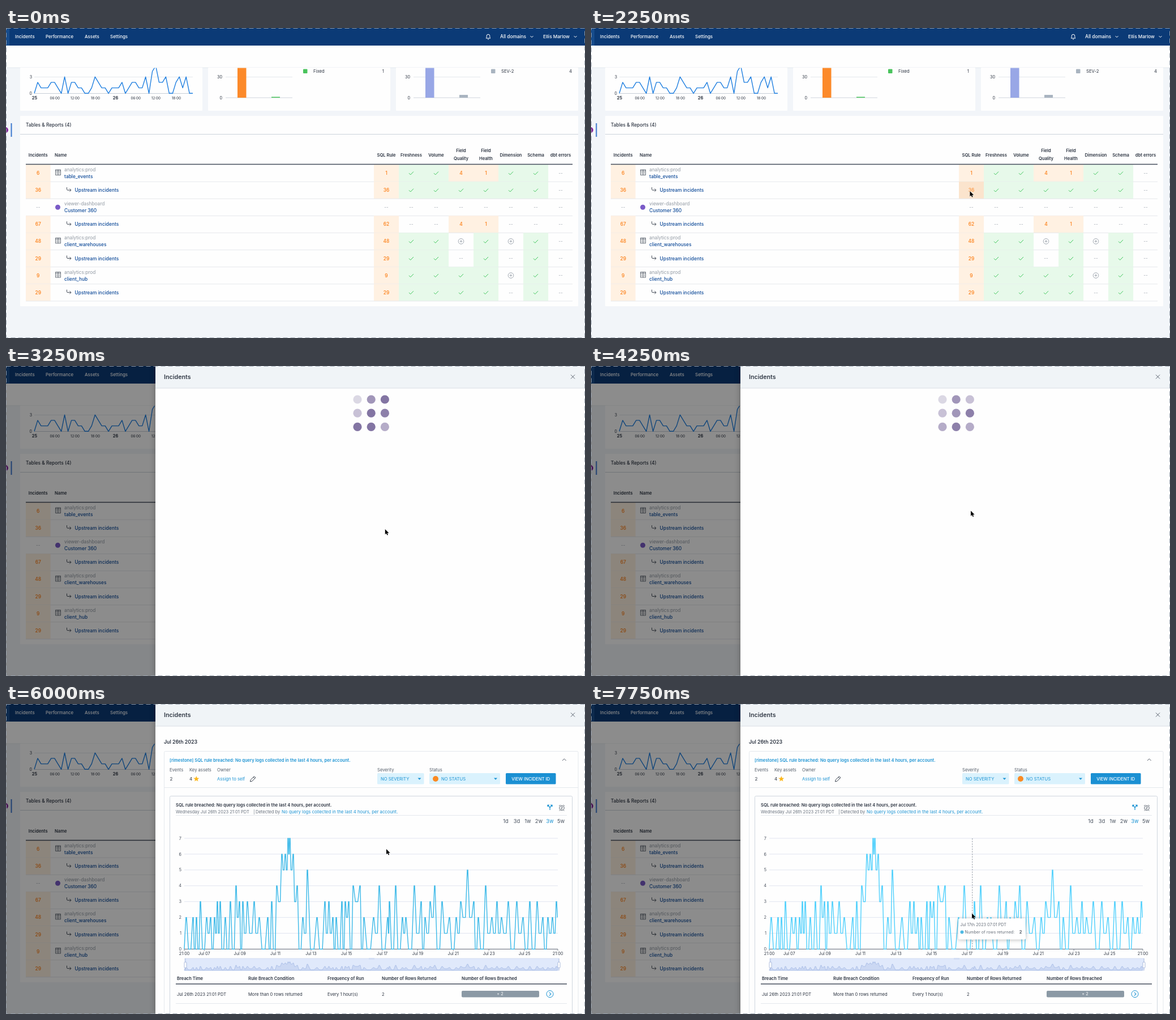
Write an HTML page that moves like this. It is 1023x547 px and loops after 8 s.

```html
<!DOCTYPE html>
<html lang="en">
<head>
<meta charset="utf-8">
<title>Incident drawer</title>
<style>
html, body { margin: 0; width: 100%; height: 100%; overflow: hidden; background: #f2f5f9; }
svg { display: block; width: 100vw; height: 100vh; font-family: Inter, "Open Sans", sans-serif; }
text { white-space: pre; }
</style>
</head>
<body>
<svg id="stage" viewBox="0 0 1023 547" xmlns="http://www.w3.org/2000/svg"></svg>
<script>
const NS = 'http://www.w3.org/2000/svg';
const stage = document.getElementById('stage');
let layer = stage;

function add(tag, attrs, parent = layer) {
  const el = document.createElementNS(NS, tag);
  for (const k in attrs) el.setAttribute(k, attrs[k]);
  return parent.appendChild(el);
}
function group(attrs, draw) {
  const outer = layer;
  const g = layer = add('g', attrs || {});
  if (draw) draw();
  layer = outer;
  return g;
}
const rect = (x, y, w, h, fill, more) => add('rect', { x, y, width: w, height: h, fill, ...more });
const path = (d, stroke, width = 1, more) =>
  add('path', { d, fill: 'none', stroke, 'stroke-width': width, ...more });
const circle = (cx, cy, r, fill, more) => add('circle', { cx, cy, r, fill, ...more });
const hline = (x1, x2, y, color, width) => path(`M${x1} ${y}H${x2}`, color, width);
// y is the vertical middle of the line of text
function text(str, x, y, size, fill, weight = 400, anchor = 'start') {
  const el = add('text', { x, y: y + size * 0.36, 'font-size': size, fill,
    'font-weight': weight, 'text-anchor': anchor });
  el.textContent = str;
  return el;
}
const mid = (str, x, y, size, fill, weight) => text(str, x, y, size, fill, weight, 'middle');
const end = (str, x, y, size, fill, weight) => text(str, x, y, size, fill, weight, 'end');

const INK = '#2b3340', GREY = '#8b939e', LINK = '#0e4a99', BLUE = '#1b93d3', ORANGE = '#fc8a2a';
const LINE = '#e4e8ed';

/* ---------- page ---------- */
function navBar() {
  rect(0, 0, 1023, 31, '#0b3a76');
  rect(0, 0, 6, 31, '#174c8c');
  [['Incidents', 16], ['Performance', 70], ['Assets', 139], ['Settings', 184]]
    .forEach(([s, x]) => text(s, x, 15, 7.95, '#fff', 500));
  path('M848 18c1.2-1 1.2-2 1.2-4a2.8 2.8 0 0 1 5.6 0c0 2 0 3 1.2 4zM851 19.6q1 1 2.200 0', '#fff', 1);
  text('All domains', 873, 15, 8.3, '#fff', 500);
  text('Ellis Marlow', 949, 15, 8.2, '#fff', 500);
  [929, 1006].forEach(x => path(`M${x - 2.5} 14l2.500 2.500 2.500-2.500`, '#fff', 1));
  rect(0, 31, 1023, 39, '#fefefe');
  hline(0, 1023, 70, LINE);
}

function charts() {
  [25, 357, 689].forEach(x => rect(x, 70, 322, 76, '#fefefe', { rx: 1 }));
  const hours = [0, 2, 1, 1, 1, 2, 2, 1, 0, 3, 0, 2, 2, 1, 1, 0, 0, 1, 3, 2, 1, 1, 0, 1,
    1, 1, 2, 0, 1, 2, 2, 1, 1, 3, 0, 4, 5, 2, 2, 3, 0, 0, 2, 3, 1, 3, 0, 0];
  hline(50, 330, 86.5, LINE);
  hline(50, 330, 115.5, '#c7ced8');
  end('3', 46, 86, 7, INK);
  end('0', 46, 115, 7, INK);
  add('clipPath', { id: 'plot' }).appendChild(rect(40, 70.5, 300, 60, '#000'));
  path('M' + hours.map((v, i) => `${(50 + i * 5.96).toFixed(1)} ${(115.3 - v * 9.7).toFixed(1)}`).join('L'),
    '#1f7fe0', 1.4, { 'clip-path': 'url(#plot)', 'stroke-linejoin': 'round' });
  ['25', '06:00', '12:00', '18:00', '26', '06:00', '12:00', '18:00'].forEach((s, i) => {
    const day = i % 4 === 0;
    mid(s, 50.5 + i * 35.75, 123.500, day ? 7.400 : 6.300, INK, day ? 700 : 400);
  });
  [[388, ORANGE, '#49c35c', 1.5, 'Fixed', '1', 668], [720, '#98a7e6', '#a9b4c0', 5, 'SEV-2', '4', 1000]]
    .forEach(([x, tall, low, h, name, n, right]) => {
      hline(x, x + 118, 86.5, LINE);
      hline(x, x + 118, 123, '#cfd5dd');
      end('30', x - 6, 86.500, 7.2, INK);
      end('0', x - 6, 123, 7.2, INK);
      rect(x + 21, 70.500, 15.500, 52.500, tall);
      rect(x + 81, 123 - h, 15, h, low);
      rect(x + 137, 72.500, 7.500, 7.500, low, { rx: 1 });
      text(name, x + 155, 76, 7.700, INK);
      end(n, right, 76, 7.700, INK);
    });
}

const ROWS = [
  ['6', 'analytics:prod', 'table_events', '1 c c 4 1 c c -'],
  ['36', '', '', '36 c c c c c c -'],
  ['-', 'viewer-dashboard', 'Customer 360', '- - - - - - - -'],
  ['67', '', '', '62 - - 4 1 - - -'],
  ['48', 'analytics:prod', 'client_warehouses', '48 c c + c + c -'],
  ['29', '', '', '29 c c - c - c -'],
  ['9', 'analytics:prod', 'client_hub', '9 c c c c + c -'],
  ['29', '', '', '29 c c c c - c -'],
];
const HEADS = ['SQL Rule', 'Freshness', 'Volume', 'Field Quality', 'Field Health',
  'Dimension', 'Schema', 'dbt errors'];
let hoverCell;

function cell(kind, x, y, w) {
  const cx = x + w / 2, top = y - 15;
  if (kind === 'c') {
    rect(x, top, w + .1, 30.200, '#e7f9ea');
    path(`M${cx - 4} ${y + .2}l2.700 2.700 5.300-5.400`, '#3fc75b', 1);
  } else if (kind === '-') {
    mid('--', cx, y, 8, '#9aa1ab');
  } else if (kind === '+') {
    circle(cx, y, 4.800, 'none', { stroke: '#98a0aa', 'stroke-width': .9 });
    path(`M${cx - 2.300} ${y}h4.600M${cx} ${y - 2.300}v4.600`, '#98a0aa', .9);
  } else {
    const box = rect(x, top, w + .1, 30.200, '#fff1e2');
    const label = mid(kind, cx, y, 8.400, ORANGE, 600);
    return [box, label];
  }
}

function table() {
  rect(25, 155, 986, 336, '#fefefe', { rx: 1 });
  text('Tables & Reports (4)', 35, 171.500, 8.300, INK, 500);
  hline(25, 1011, 187.500, '#ccd2da');
  mid('Incidents', 56.700, 224, 7.600, INK, 600);
  text('Name', 86, 224, 7.600, INK, 600);
  HEADS.forEach((h, i) => {
    const words = h.startsWith('Field') ? h.split(' ') : [h];
    words.forEach((w, k) => mid(w, 672 + i * 44, words.length > 1 ? 216.500 + k * 14 : 224, 7.600, INK, 600));
  });
  ROWS.forEach(([count, kind, name, cells], r) => {
    const y = 256 + r * 30.1;
    cell(count, 35, y, 43.500);
    cells.split(' ').forEach((c, i) => {
      const made = cell(c, 650 + i * 44, y, 44);
      if (r === 1 && i === 0) hoverCell = made;
    });
    if (name) {
      text(kind, 103, y - 6, 8.300, '#9199a3');
      text(name, 103, y + 6, 8.400, LINK, 500);
      if (r === 2) circle(91.500, y, 4.500, '#7a5bc7');
      else path(`M87.500 ${y - 6}h9v9.500h-9zM92 ${y - 6}v9.500M87.500 ${y - 4}h9M89 ${y - 1.500}h1.800M93.300 ${y - 1.500}h1.800M89 ${y + 1}h1.800M93.300 ${y + 1}h1.800`,
        '#59616d', .9);
    } else {
      path(`M107.500 ${y - 5}v3.500q0 1.500 1.500 1.500h6m-2.600-2.600l2.600 2.600-2.600 2.600`, '#444c58', 1);
      text('Upstream incidents', 121.500, y, 8.400, LINK, 500);
    }
    hline(35, 1001, y + 15.200, '#e6e8ec');
  });
  hline(35, 1001, 240.500, '#444c5b', 1.4);
}

/* ---------- drawer ---------- */
function select(label, x, w, str, tx) {
  text(label, x, 116.500, 7.650, '#555e6a');
  rect(x, 122, w, 19.500, '#daf2fd', { rx: 1.500 });
  text(str, tx, 132, 7.650, BLUE);
  add('path', { d: `M${x + w - 11} 130.500h6l-3 3.200z`, fill: BLUE });
}

function details() {
  const sentence = 'No query logs collected in the last 4 hours, per account.';
  const title = 'SQL rule breached: ' + sentence;
  text('Jul 26th 2023', 279, 67, 8.800, INK, 600);
  rect(279.500, 83.500, 731.500, 480, 'none', { stroke: LINE, rx: 2 });
  text('[rimestone] ' + title, 289, 99, 7.550, BLUE, 600);
  path('M983 100l3.300-3.300 3.300 3.300', '#59616d', 1);
  [['Events', 289], ['Key assets', 324], ['Owner', 373]]
    .forEach(([s, x]) => text(s, x, 116.500, 7.650, '#555e6a'));
  text('2', 289.500, 132, 8, INK);
  text('4', 324, 132, 8, INK);
  const star = [...Array(10)].map((_, i) => {
    const a = i * Math.PI / 5, r = i % 2 ? 2.300 : 5.300;
    return `${336.300 + r * Math.sin(a)},${132.300 - r * Math.cos(a)}`;
  });
  add('polygon', { points: star.join(' '), fill: '#fcb71c' });
  text('Assign to self', 373, 132, 7.700, BLUE);
  path('M431.500 137l.800-3.300 6.200-6.200 2.500 2.500-6.200 6.200zM437 129l2.500 2.500', '#3f4753', 1);
  select('Severity', 656, 82.500, 'NO SEVERITY', 662);
  select('Status', 748, 125, 'NO STATUS', 769);
  circle(759, 132, 5, '#fa8a22');
  rect(883, 122, 88.500, 19.500, '#1b90d3', { rx: 1.500 });
  mid('VIEW INCIDENT ID', 927.200, 131.800, 7.650, '#fff', 500);
  hline(280, 1011, 147.500, LINE);

  rect(289.500, 162.500, 711, 420, '#fefefe', { stroke: '#cfd6de', rx: 2 });
  text(title, 300, 178, 7.550, INK, 600);
  text('Wednesday Jul 26th 2023 21:01 PDT', 300, 190, 7.500, '#68717d');
  text('|', 437, 190, 7.500, '#68717d');
  text('Detected by', 441, 190, 7.550, '#68717d');
  hline(300, 991, 196.500, LINE);
  ['1d', '3d', '1w', '2w', '3w', '5w'].forEach((s, i) =>
    mid(s, 883 + i * 19.500, 206.500, 9.300, s === '3w' ? BLUE : '#4b5461'));
  [['Breach Time', 302], ['Rule Breach Condition', 428], ['Frequency of Run', 568],
    ['Number of Rows Returned', 664], ['Number of Rows Breached', 805]]
    .forEach(([s, x]) => text(s, x, 484, 7.600, INK, 600));
  hline(300, 991, 494, '#444c5b', 1.4);
  [['Jul 26th 2023 21:01 PDT', 302], ['More than 0 rows returned', 428], ['2', 664]]
    .forEach(([s, x]) => text(s, x, 512, 7.600, INK));
  rect(805, 506, 137, 11.500, '#8b99a5', { rx: 2 });
  mid('+ 2', 873, 511.800, 7.400, '#fff');
  circle(961, 511.700, 6, 'none', { stroke: BLUE });
  path('M960 508.800l2.800 2.900-2.800 2.900', BLUE, 1.100);
  hline(300, 991, 528.500, LINE);

  const pending = group({}, () => {
    text(sentence, 487, 190, 7.650, '#68717d');
    [609.500, 613.500, 617.500].forEach(x => circle(x, 511.700, 1.100, '#8b939e'));
    circle(645, 352.500, 11.600, 'none', { stroke: '#90c1f2', 'stroke-width': 3.600 });
  });
  const arc = add('path', { d: 'M651.700 343A11.600 11.600 0 0 1 647 364', fill: 'none',
    stroke: '#1a7fe5', 'stroke-width': 3.600 }, pending);
  const ready = group({}, () => {
    text(sentence, 487, 190, 7.750, BLUE);
    text('Every 1 hour(s)', 568, 512, 7.600, INK);
    path('M961 187v-4.500l-3.600-3.700M961 182.500l3.600-3.700M957 181.300v-3h3M962 178.300h3v3', BLUE, 1.300);
    circle(982, 183.500, 4.200, 'none', { stroke: '#59616d' });
    path('M980.400 181.800h3.200l-3.200 3.400h3.200M977 180l2.500-2M987 180l-2.500-2M979 187l-1.200 1.500M985 187l1.200 1.500',
      '#59616d', .9);
  });
  return { pending, arc, ready };
}

/* ---------- rows chart ---------- */
const X0 = 315, X1 = 975, Y0 = 432.500, UNIT = 27.930, HOUR = (X1 - X0) / 504;
const PEAKS = [[318, 2], [330, 2], [336, 2], [343, 3], [354, 2], [361, 2], [368, 2], [373, 3], [378, 3],
  [387, 2], [396, 3], [406, 4], [412, 3], [418, 3], [426, 3], [438, 3], [447, 2], [462, 2], [469, 3],
  [478, 4], [487, 6], [493, 6], [498, 7], [501, 7], [507, 6], [514, 4], [524, 2], [532, 5], [549, 2],
  [563, 3], [570, 3], [577, 2], [583, 2], [593, 3], [599, 3], [605, 3], [613, 4], [625, 4], [632, 2],
  [649, 2], [659, 4], [674, 2], [677, 3], [688, 4], [700, 2], [706, 2], [721, 4], [733, 3], [740, 2],
  [749, 3], [757, 4], [770, 3], [783, 2], [795, 2], [803, 3], [815, 5], [826, 3], [834, 2], [847, 4],
  [858, 2], [867, 3], [875, 2], [887, 3], [902, 3], [913, 2], [925, 3], [938, 3], [948, 2], [957, 2],
  [965, 2], [972, 3]];

function series() {
  let seed = 11;
  const rnd = () => (seed = seed * 16807 % 2147483647) / 2147483647;
  const pts = [[X0, 0], [X0 + 1.3, 1]];
  PEAKS.forEach(([x, h], i) => {
    pts.push([x, h], [x + 1, h]);
    const next = PEAKS[i + 1];
    if (!next) return;
    const gap = next[0] - x - 1, low = Math.min(h, next[1]);
    const dip = low > 3 ? low - 1 : gap > 12 ? 0 : Math.floor(rnd() * low);
    pts.push([x + 1 + gap * .3, dip], [next[0] - gap * .3, dip]);
  });
  pts.push([X1 - .8, 2]);
  return pts;
}
const DATA = series();
const trace = (base, unit) =>
  'M' + DATA.map(([x, v]) => `${x.toFixed(1)} ${(base - v * unit).toFixed(1)}`).join('L');
function valueAt(x) {
  const i = Math.max(1, DATA.findIndex(p => p[0] >= x));
  const [a, b] = [DATA[i - 1], DATA[i]];
  return Math.round(a[1] + (b[1] - a[1]) * (x - a[0]) / (b[0] - a[0]));
}

function rowsChart() {
  for (let v = 0; v < 8; v++) {
    const y = Y0 - v * UNIT;
    hline(X0, X1, y, v ? '#e1e5f0' : '#626a78');
    end(String(v), 310, y, 7.300, '#4a525e');
  }
  const tick = (s, x) => {
    path(`M${x} ${Y0}v3`, '#626a78', .8);
    mid(s, x, 440.500, 7.200, INK);
  };
  tick('21:00', X0);
  for (let i = 0; i < 10; i++) {
    tick('Jul ' + String(7 + 2 * i).padStart(2, '0'), 350.300 + i * 62.860);
  }
  tick('21:00', X1);
  const curve = path(trace(Y0, UNIT), '#3cb9e8', 1.400, { 'stroke-linejoin': 'round' });
  rect(316, 449, 661, 21, '#e0e9fb', { stroke: '#ccd7ee', 'stroke-width': .8 });
  path(trace(469, 2) + 'V470H315Z', '#9fb5e3', .7, { fill: '#cbd8f3' });
  rect(641, 448, 10, 3, '#d3def4');
  [317, 977].forEach(x => {
    path(`M${x} 449v21`, '#a9b9dd', .8);
    rect(x - 2, 455.500, 4, 10, '#fff', { stroke: '#9caed5', 'stroke-width': .8, rx: 1 });
  });
  return curve;
}

function tooltip() {
  const guide = path('', '#8a919c', .9, { 'stroke-dasharray': '2.5 2' });
  const box = group({}, () => {
    rect(0, 0, 119, 37, '#fff', { rx: 2, style: 'filter:drop-shadow(0 1px 3px rgba(0,0,0,.25))' });
  });
  const inside = fn => { const old = layer; layer = box; const r = fn(); layer = old; return r; };
  const date = inside(() => text('', 3.500, 11, 7.200, '#666e79'));
  inside(() => circle(6.500, 24, 3, '#4fb9e3'));
  inside(() => text('Number of rows returned:', 11.500, 23.500, 7.200, '#666e79'));
  const value = inside(() => end('', 112.500, 23.500, 7.400, '#555d68', 700));
  return (x, y) => {
    const hour = Math.floor((x + 1 - X0) / HOUR), px = X0 + hour * HOUR;
    const clock = 21 + hour, two = n => String(n).padStart(2, '0');
    guide.setAttribute('d', `M${px.toFixed(1)} 237V${Y0}`);
    box.setAttribute('transform', `translate(${x - 24} ${y + 9})`);
    date.textContent = `Jul ${two(5 + Math.floor(clock / 24))}th 2023 ${two(clock % 24)}:01 PDT`;
    value.textContent = valueAt(px);
  };
}

/* ---------- build ---------- */
navBar();
charts();
circle(-1, 180, 5, '#86269a');
rect(8.500, 168, 2, 24, '#3b78cf');
table();
const shade = rect(0, 0, 1023, 547, '#000');

let loader, content, parts, plot, curve, tip, moveTip;
const DOTS = [0, 3, 8, 1, 6, 4, 7, 5, 2];
const dots = [];
const drawer = group({}, () => {
  rect(264, 0, 760, 547, '#fefefe', { style: 'filter:drop-shadow(-2px 0 4px rgba(0,0,0,.2))' });
  rect(264, 0, 760, 39, '#f0f4f7');
  hline(264, 1023, 39, '#d8dee5');
  text('Incidents', 279, 19, 10.700, '#333b47', 600);
  path('M998 15.500l7 7M1005 15.500l-7 7', '#59616d', 1);
  loader = group({}, () => DOTS.forEach((_, i) =>
    dots.push(circle(621 + i % 3 * 24.200, 59 + Math.floor(i / 3) * 24.200, 7.600, '#8375a3'))));
  content = group({}, () => {
    parts = details();
    plot = group({}, () => {
      curve = rowsChart();
      tip = group({}, () => { moveTip = tooltip(); });
    });
  });
});
rect(.5, .5, 1022, 546, 'none', { stroke: '#9aa4b0', 'stroke-width': .9, 'stroke-dasharray': '8 5' });
const cursor = add('path', { d: 'M0 0v9.300l2.100-2 1.500 3.300 1.600-.700-1.500-3.200h3z', fill: '#000',
  stroke: '#fff', 'stroke-width': .7, 'paint-order': 'stroke' });

/* ---------- motion ---------- */
const LOOP = 8000, STEP = 250;
const POINTER = [[500, 726, 140], [750, 721, 165], [1000, 700, 218], [1250, 676, 272], [1500, 669.500, 286],
  [1750, 669.500, 286], [2250, 669.500, 288], [3250, 669.800, 288], [4250, 671, 255.500], [5250, 672, 256.500],
  [6000, 672, 256], [6250, 669, 210], [6500, 664, 152], [6750, 664, 147.500], [7000, 664, 175],
  [7250, 667, 250], [7500, 672, 340], [7750, 673, 369.500]];
const show = (el, on) => el.setAttribute('visibility', on ? 'inherit' : 'hidden');

function pointerAt(t) {
  const i = POINTER.findIndex(p => p[0] >= t);
  if (i <= 0) return POINTER[0].slice(1);
  const a = POINTER[i - 1], b = POINTER[i], k = (t - a[0]) / (b[0] - a[0]);
  return [a[1] + (b[1] - a[1]) * k, a[2] + (b[2] - a[2]) * k];
}

function render(t) {
  const [x, y] = pointerAt(t);
  cursor.setAttribute('transform', `translate(${x} ${y})`);
  show(cursor, t >= 500);

  const over = t >= 1250;
  hoverCell[0].setAttribute('fill', over ? '#fbe4cd' : '#fff1e2');
  hoverCell[1].setAttribute('opacity', over ? .75 : 1);

  const p = Math.min(1, Math.max(0, (t - 2850) / 300));
  const left = Math.pow(1 - p, 2.760);
  drawer.setAttribute('transform', `translate(${759 * left} 0)`);
  show(drawer, p > 0);
  shade.setAttribute('opacity', .45 * (1 - left));

  const loaded = t >= 4750, drawn = t >= 6000;
  show(loader, !loaded);
  show(content, loaded);
  dots.forEach((dot, i) => {
    const time = (t - 2800) / 1000 - DOTS[i] / 10;
    dot.setAttribute('fill-opacity', time < 0 ? 1 : .2 + 1.6 * Math.abs(time % 1 - .5));
  });
  show(parts.pending, !drawn);
  show(parts.ready, drawn);
  show(plot, drawn);
  parts.arc.setAttribute('transform', `rotate(${(t - 5250) * .36} 645 352.5)`);

  const hot = t > 6750 && y > 237 && y < Y0;
  curve.setAttribute('stroke', hot ? '#4fd0fc' : '#3cb9e8');
  show(tip, hot);
  if (hot) moveTip(x, y);
}

const start = performance.now();
function frame() {
  const t = (performance.now() - start) % LOOP;
  render(Math.floor(t / STEP) * STEP);
  requestAnimationFrame(frame);
}
frame();
</script>
</body>
</html>
```
